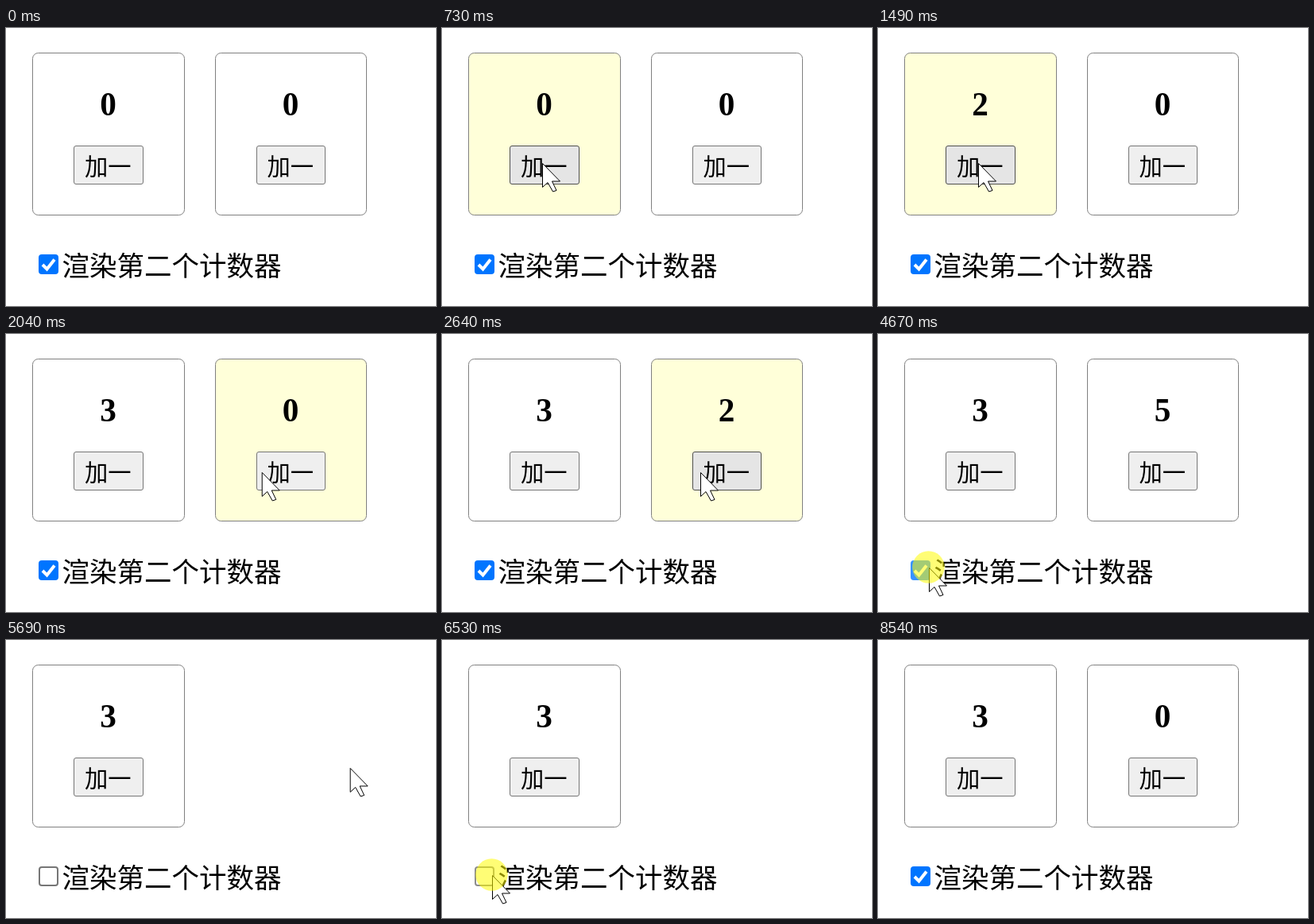
An HTML page that plays this animation: 541x350 px, repeating every 8600 ms.

```html
<!DOCTYPE html>
<html lang="zh-CN">
<head>
<meta charset="utf-8">
<style>
  html, body { margin: 0; width: 100%; height: 100%; overflow: hidden; background: #fff; }
  svg { display: block; width: 541px; height: 350px; }
  text { font-family: "Noto Sans CJK SC", "Noto Sans CJK", sans-serif; font-weight: 300; }
  .count { font: bold 41.2px "Liberation Serif", serif; text-anchor: middle; }
  .caption { font-size: 29.3px; text-anchor: middle; }
  .label { font-size: 34.5px; }
  .card { fill: #fff; stroke: #808080; }
  .card.hover { fill: #ffffd9; }
  .button { fill: #efefef; stroke: #767676; }
  .button.hover { fill: #e5e5e5; stroke: #4f4f4f; }
  .button.active { fill: #f5f5f5; stroke: #8d8d8d; }
  .box { fill: #fff; stroke: #767676; stroke-width: 2; }
  .box.hover { stroke: #4f4f4f; }
  .box.active { stroke: #8d8d8d; }
  .box.checked { fill: #0075ff; stroke: #0075ff; }
  .box.checked.hover { fill: #005cc8; stroke: #005cc8; }
  .box.checked.active { fill: #3793ff; stroke: #3793ff; }
</style>
</head>
<body>
<svg viewBox="0 0 541 350">
  <g id="cards"></g>
  <rect class="box" x="42" y="286" width="23" height="23" rx="3"/>
  <path id="tick" d="M46 298l5.5 5.5L61 291.5" fill="none" stroke="#fff" stroke-width="4"/>
  <text class="label" x="70.5" y="311.7">渲染第二个计数器</text>
  <g id="pointer">
    <path d="M.5 .5V30.5L7 24.5L13.5 36L18 34.5L12.5 23H22.500Z" fill="#fff" stroke="#000"/>
    <circle id="press" cx="-.5" cy="-.5" r="20.3" fill="#fffc00" fill-opacity=".54"/>
  </g>
</svg>
<script>
const LOOP = 8600;
const HOVER_LAG = 40;
const $ = selector => document.querySelector(selector);

// Pointer moves, each starting where the last one ended
const entry = { x: 300, y: 283 };
const moves = [
  { from: 330, to: 730, x: 126, y: 170 },
  { from: 1810, to: 2060, x: 325, y: 174 },
  { from: 3740, to: 4470, x: 64, y: 294 },
  { from: 5150, to: 5620, x: 464, y: 150 },
  { from: 5620, to: 6040, x: 52, y: 294 },
  { from: 6060, to: 6330, x: 63, y: 296 },
  { from: 7360, to: 7640, x: 300, y: 250 },
  { from: 7640, to: 7930, x: 545, y: 352 },
];

const press = (down, hold = 70) => ({ down, up: down + hold });
const clicks = [
  [0, 1, 2].map(i => press(930 + 315 * i)),
  [2340, 2560, 2720, 2920, 3240].map(down => press(down)),
];
const [hide, show] = [press(4670, 130), press(6530, 200)];
const presses = [...clicks.flat(), hide, show];

const makeCard = (x, width) => `<g>
  <rect class="card" x="${x}.5" y="31.5" width="${width}" height="204" rx="7"/>
  <text class="count" x="${x + width / 2}" y="110"></text>
  <rect class="button" x="${x + 52}.5" y="148.5" width="${width - 104}" height="48" rx="2.5"/>
  <text class="caption" x="${x + width / 2 - .2}" y="184.7">加一</text>
</g>`;
$('#cards').innerHTML = makeCard(33, 191) + makeCard(263, 190);
const cards = [...$('#cards').children];

const ease = k => k * k * (3 - 2 * k);

function pointer(t) {
  if (t < moves[0].from) return { x: -99, y: -99 };
  return moves.reduce((p, move) => {
    const k = (t - move.from) / (move.to - move.from);
    const e = ease(Math.min(1, Math.max(0, k)));
    return { x: p.x + (move.x - p.x) * e, y: p.y + (move.y - p.y) * e };
  }, entry);
}

const within = ({ x, y }, left, top, right, bottom) =>
  x >= left && x <= right && y >= top && y <= bottom;

const isDown = (list, t) => list.some(({ down, up }) => t >= down && t < up);

const setVisible = (element, visible) => element.style.display = visible ? '' : 'none';

function setState(element, hover, active = false) {
  element.classList.toggle('hover', hover);
  element.classList.toggle('active', active);
}

function render(t) {
  const { x, y } = pointer(t);
  const spot = pointer(t - HOVER_LAG);
  const checked = t < hide.up || t >= show.up;

  cards.forEach((card, i) => {
    const left = 33 + 230 * i;
    const count = clicks[i].filter(({ up }) => t >= up).length;
    card.querySelector('.count').textContent = i && t >= show.up ? 0 : count;
    setState(card.querySelector('.card'), within(spot, left, 31, left + 191, 236));
    setState(card.querySelector('.button'),
      within(spot, left + 52, 148, left + 139, 197), isDown(clicks[i], t));
  });
  setVisible(cards[1], checked);

  const box = $('.box');
  box.classList.toggle('checked', checked);
  setState(box, within(spot, 41, 283, 348, 315), isDown([hide, show], t));
  setVisible($('#tick'), checked);

  setVisible($('#press'), isDown(presses, t));
  $('#pointer').setAttribute('transform', `translate(${x} ${y})`);
}

function frame() {
  render(performance.now() % LOOP);
  requestAnimationFrame(frame);
}
frame();
</script>
</body>
</html>
```
